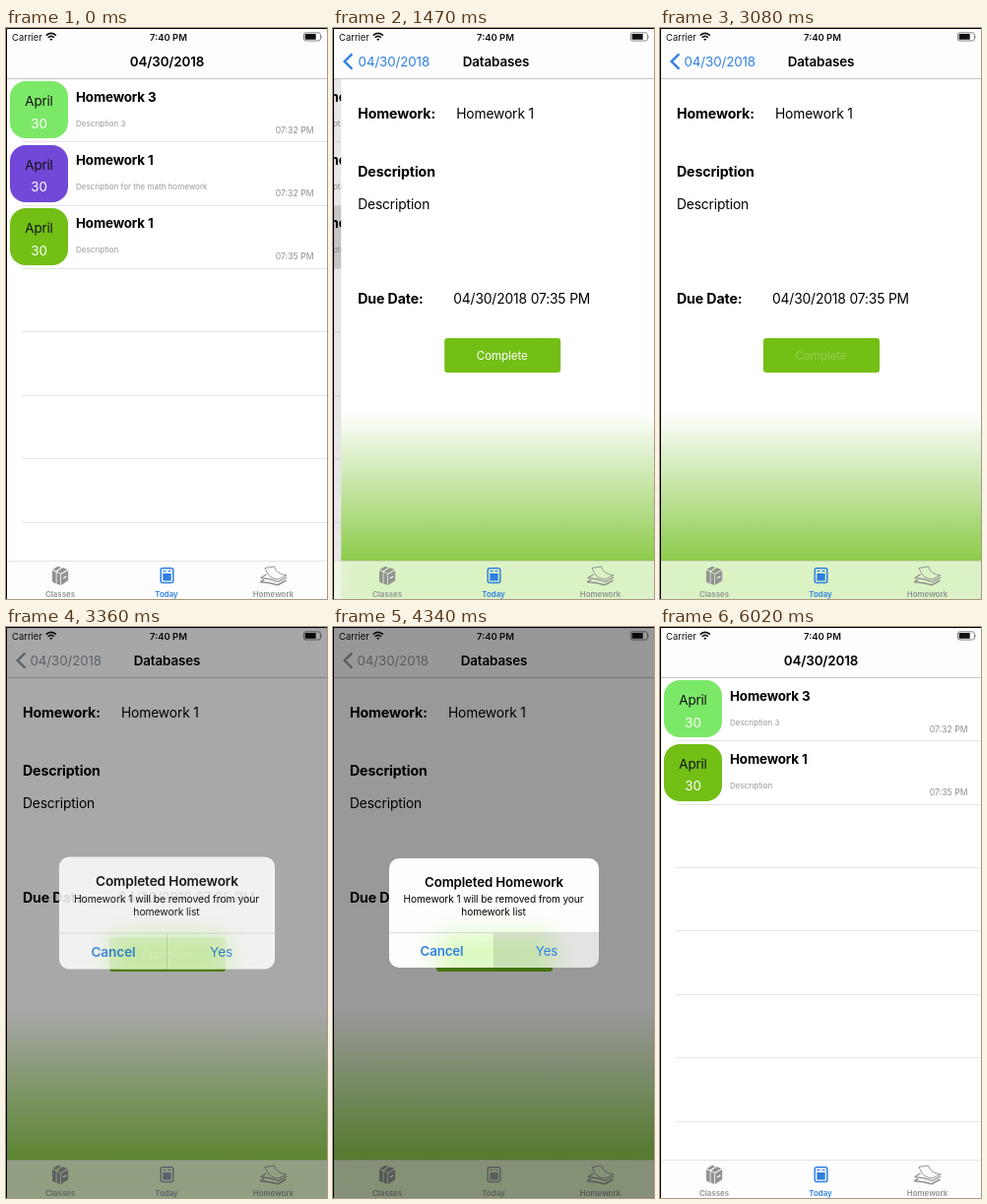
These frames come from a looping animation (326x580 px, 6.09 s). An HTML page:

```html
<!DOCTYPE html>
<html lang="en">
<head>
<meta charset="utf-8">
<title>Homework planner</title>
<style>
html, body { margin: 0; width: 100%; height: 100%; overflow: hidden; background: #fff; }
#stage {
  --tint: #2f80e2;
  position: absolute; left: 0; top: 0; width: 326px; height: 580px;
  overflow: hidden; background: #fff;
  font-family: Inter, "Liberation Sans", sans-serif;
}
#stage div, #stage span, #stage svg { position: absolute; }
.layer { left: 0; top: 0; width: 326px; height: 580px; }
span { white-space: pre; line-height: 20px; letter-spacing: -.01em; }
.plain { letter-spacing: 0; }
.row { left: 0; width: 326px; height: 64.4px; }
.line { left: 16px; width: 326px; height: 1px; background: #e5e5e5; }
.badge { left: 4px; top: 3.2px; width: 59px; height: 58px; border-radius: 16px; }
.picked { background: #d9d9d9; }
.picked .badge { background: none !important; }
#shade { background: #000; }
#detail { background: linear-gradient(#fff 390px, #8ccb4b 541px, #86c843 580px); }
#button { left: 104.5px; top: 314.5px; width: 118px; height: 35.5px; border-radius: 3px; background: #73bf16; }
#nav { left: 0; top: 0; width: 326px; height: 51px; background: #fdfdfd; border-bottom: 1px solid #c4c4c4; }
#tabs {
  left: 0; top: 541px; width: 326px; height: 39px;
  background: rgba(252, 252, 252, .75);
  backdrop-filter: blur(14px) saturate(1.5);
  box-shadow: inset 0 1px rgba(0, 0, 0, .1);
}
#dim { background: #000; }
#alert { left: 57px; top: 235px; width: 213px; height: 110.5px; border-radius: 10px; overflow: hidden; background: #fdfdfd; }
#glow { left: 46px; top: 76px; width: 124px; height: 44px; border-radius: 22px; background: #dcfac0; filter: blur(11px); }
#yes { left: 107px; top: 76px; width: 106px; height: 35px; background: rgba(0, 0, 0, .1); }
.rule { background: rgba(0, 0, 0, .13); }
.edge { background: #000; left: 0; top: 0; }
</style>
</head>
<body>
<div id="stage">
  <div id="list" class="layer"></div>
  <div id="shade" class="layer"></div>
  <div id="detail" class="layer"><div id="button"></div></div>
  <div id="nav">
    <svg id="chevron" width="30" height="51" fill="none" stroke="var(--tint)" stroke-width="2.4">
      <path d="M19.4 26.3L11.7 34l7.7 7.7"/>
    </svg>
  </div>
  <div id="tabs">
    <svg width="326" height="39" viewBox="0 541 326 39">
      <g fill="#929292">
        <path d="M47 551l3.700 1.600v12l-3.700-2.100zM51.500 553l3.700 1.600v11.400l-3.700-1.500z"/>
        <path d="M47.500 550l5.500-3.200 3 1.200-5.200 3.600zM52 552.200l5.500-3.900 5 1.800-6.800 3.800z"/>
        <path d="M56 555l7.200-4v10.200l-7.200 4.900z"/>
      </g>
      <path d="M58 559l3.300-2" stroke="#fff" stroke-width="1.200"/>
      <g fill="var(--tint)">
        <rect x="157.200" y="548.800" width="12.600" height="14.800" rx="2" fill="none" stroke="var(--tint)" stroke-width="1.500"/>
        <rect x="159.300" y="554" width="8.400" height="7.600" rx=".6"/>
        <path d="M159.500 551h3v1.300h-3zM164.500 551h3v1.300h-3z"/>
      </g>
      <g fill="none" stroke="#929292" stroke-linejoin="round">
        <path d="M263 548.500l9.500-1.500c1.500 5 5.500 8 12.500 9l-8.500 4c-9-.5-11-6-13.500-11.500z"/>
        <path d="M264.500 555l-5.500 3.500c6 .5 11 1.500 17.500 4l8.500-4.500" stroke-width="1.300"/>
        <path d="M262 560.500l-3.500 2.200c6 .3 11 1 17.500 3l8.500-4.700" stroke-width="1.600"/>
      </g>
    </svg>
  </div>
  <svg class="layer" viewBox="0 0 326 580">
    <g fill="none" stroke="#111" stroke-width="1.500">
      <path d="M40.700 7.600q5.100-4.400 10.200 0M42.600 9.700q3.200-2.700 6.400 0"/>
      <rect x="302.400" y="4.800" width="17" height="8.200" rx="2" stroke="#777" stroke-width=".9"/>
    </g>
    <path d="M44.200 11.300q1.600-1.300 3.200 0l-1.600 1.700zM303.700 6.100h11v5.600h-11z" fill="#111"/>
    <path d="M320.300 7.400q1.600 1.500 0 3z" fill="#777"/>
  </svg>
  <div id="status" class="layer"></div>
  <div id="dim" class="layer"></div>
  <div id="alert">
    <div id="glow"></div>
    <div id="yes"></div>
    <div class="rule" style="left:0;top:75px;width:213px;height:1px"></div>
    <div class="rule" style="left:106px;top:76px;width:1px;height:35px"></div>
  </div>
  <div class="edge" style="width:326px;height:1px"></div>
  <div class="edge" style="width:1px;height:580px"></div>
</div>
<script>
const LOOP = 6090, STEP = 70, WIDTH = 326, ROW = 64.4, TOP = 51.3;
const $ = id => document.getElementById(id);
const clamp = v => Math.min(1, Math.max(0, v));

function box(parent, cls, style = {}) {
  const el = document.createElement('div');
  el.className = cls;
  Object.assign(el.style, style);
  parent.append(el);
  return el;
}

// y is the middle of the capitals; align is the share of the width left of x
function text(parent, str, x, y, size, weight = 400, color = '#000', align = 0, cls = '') {
  const el = document.createElement('span');
  const inner = document.createElement('span');
  el.style.cssText = `left:${x}px;top:${y - 10}px;font-size:${size}px;font-weight:${weight};color:${color}`;
  inner.style.cssText = `left:0;top:0;transform:translateX(${-100 * align}%)`;
  inner.className = cls;
  inner.textContent = str;
  el.append(inner);
  parent.append(el);
  return el;
}

const tasks = [
  ['#7ce868', 'Homework 3', 'Description 3', '07:32 PM'],
  ['#7248d8', 'Homework 1', 'Description for the math homework', '07:32 PM'],
  ['#73bf16', 'Homework 1', 'Description', '07:35 PM']
];

function addRows(items) {
  const group = box($('list'), 'layer');
  items.forEach(([color, name, note, time], i) => {
    const row = box(group, 'row', { top: TOP + i * ROW + 'px' });
    box(row, 'badge', { background: color });
    text(row, 'April', 33.5, 23.2, 13.4, 400, '#111', .5);
    text(row, '30', 33.5, 45.8, 13.4, 400, '#fff', .5);
    text(row, name, 71, 18.3, 13.4, 700);
    text(row, note, 71, 45.3, 8, 400, '#999', 0, 'plain');
    text(row, time, 312.5, 52.3, 8.67, 400, '#8e8e8e', 1, 'plain');
  });
  for (let i = 1; i < 8; i++) box(group, 'line', { top: Math.round(TOP + i * ROW - .5) + 'px' });
  return group;
}

const before = addRows(tasks);
const after = addRows([tasks[0], tasks[2]]);
const lastRow = before.children[2];

const detail = $('detail');
[['Homework:', 87], ['Description', 146], ['Due Date:', 274.5]]
  .forEach(([s, y]) => text(detail, s, 17, y, 14.2, 700));
[['Homework 1', 117, 87], ['Description', 17, 179], ['04/30/2018 07:35 PM', 114, 274.5]]
  .forEach(([s, x, y]) => text(detail, s, x, y, 13.8));
const caption = text(detail, 'Complete', 163.5, 332.5, 11.6, 400, '#fff', .5);

const nav = $('nav');
const listTitle = text(nav, '04/30/2018', 163.5, 34, 13.4, 600, '#000', .5);
const backLabel = text(nav, '04/30/2018', 24.5, 34, 13.4, 400, 'var(--tint)');
const detailTitle = text(nav, 'Databases', 163.5, 34, 13.4, 600, '#000', .5);

text($('status'), 'Carrier', 6, 9.5, 9.46, 400, '#111', 0, 'plain');
text($('status'), '7:40 PM', 165, 9.5, 9.46, 600, '#111', .5, 'plain');

[['Classes', 55, '#929292'], ['Today', 163, 'var(--tint)'], ['Homework', 271.5, '#929292']]
  .forEach(([s, x, c]) => text($('tabs'), s, x, 34, 7.88, 600, c, .5, 'plain'));

[['Completed Homework', 106.5, 24, 13.3, 600, '#000'],
 ['Homework 1 will be removed from your', 106, 41, 10.15, 400, '#000'],
 ['homework list', 106, 53.5, 10.15, 400, '#000'],
 ['Cancel', 53.5, 93.5, 13.3, 600, '#2f80e2'],
 ['Yes', 160, 93.5, 13.3, 400, '#2f80e2']]
  .forEach(a => text($('alert'), ...a, .5));

// critically damped spring from 0 to 1
function spring(t, start, speed) {
  const u = Math.max(0, (t - start) / 1000 * speed);
  return 1 - (1 + u) * Math.exp(-u);
}

function fadeSlide(el, dx, opacity) {
  el.style.transform = `translateX(${dx}px)`;
  el.style.opacity = clamp(opacity);
}

function draw(t) {
  const done = t >= 4900;
  const push = done ? 1 - spring(t, 4910, 18) : spring(t, 1161, 18);
  const bar = done ? 1 - spring(t, 4920, 22) : spring(t, 1171, 22);
  const shown = clamp(spring(t, 3170, 18) - spring(t, 4420, 18));

  before.style.display = done ? 'none' : '';
  after.style.display = done ? '' : 'none';
  lastRow.classList.toggle('picked', t >= 840);
  $('list').style.transform = `translateX(${-.3 * WIDTH * push}px)`;
  $('shade').style.opacity = .1 * push;
  detail.style.transform = `translateX(${WIDTH * (1 - push)}px)`;
  detail.style.boxShadow = `0 0 6px rgba(0, 0, 0, ${.4 * (1 - push)})`;
  detail.style.visibility = push < .001 ? 'hidden' : '';

  fadeSlide(listTitle, -103 * bar, 1 - 1.5 * bar);
  fadeSlide(backLabel, 101 * (1 - bar), 1.5 * bar - .3);
  fadeSlide(detailTitle, 187 * (1 - bar), 2 * bar);
  $('chevron').style.opacity = clamp(1.5 * bar);

  caption.style.opacity = t < 3010 ? 1 : .22 + .78 * clamp((t - 3150) / 350);
  $('dim').style.opacity = .4 * shown;
  $('alert').style.opacity = shown;
  $('alert').style.transform = `scale(${1.2 - .2 * spring(t, 3170, 18)})`;
  $('yes').style.opacity = t >= 4270 ? 1 : 0;
  $('stage').style.setProperty('--tint', `color-mix(in srgb, #9a9a9a ${100 * shown}%, #2f80e2)`);
}

const began = performance.now();
function tick() {
  const t = (performance.now() - began) % LOOP;
  draw(Math.floor(t / STEP) * STEP);
  requestAnimationFrame(tick);
}
tick();
</script>
</body>
</html>
```
